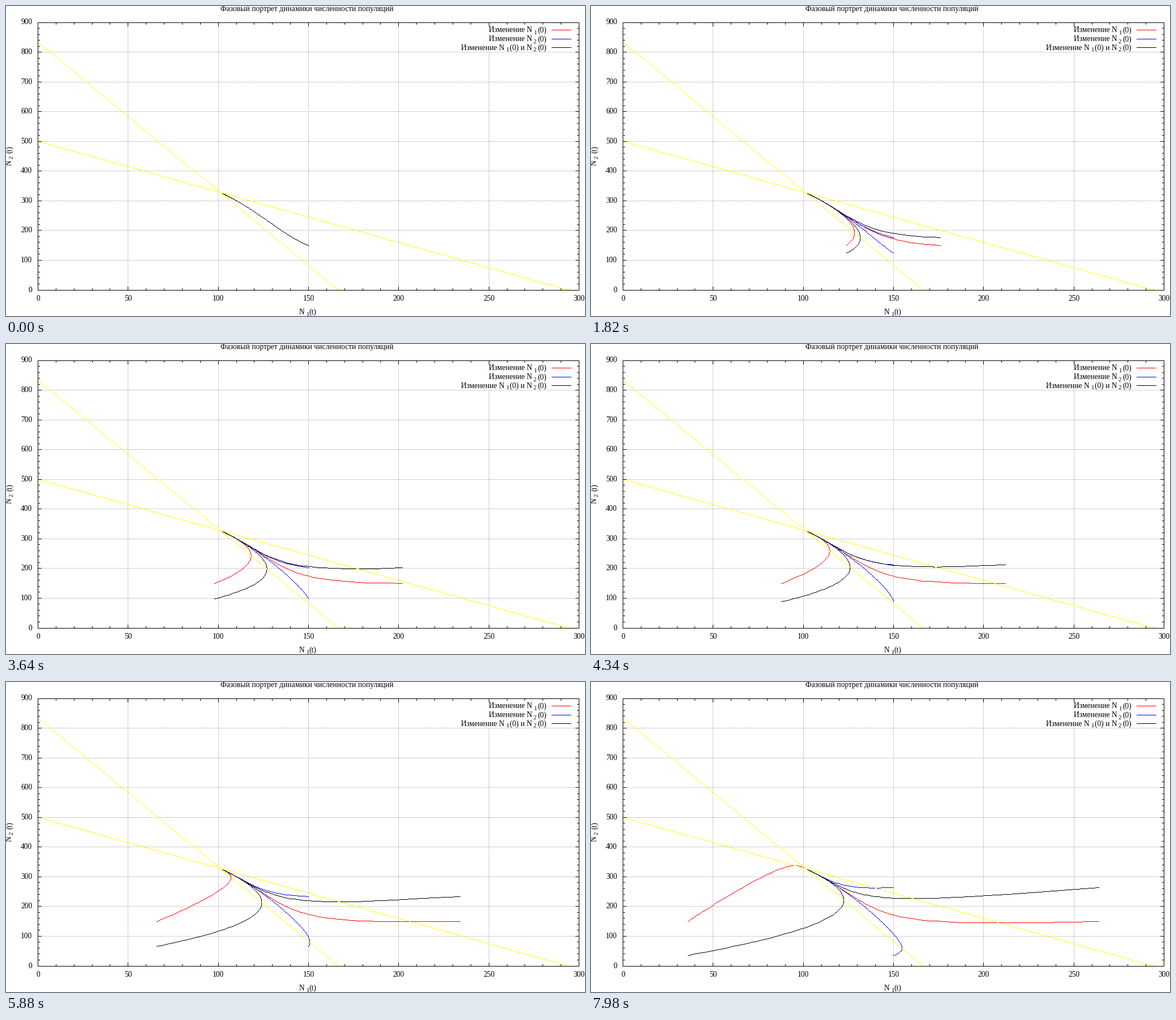
These frames come from a looping animation (1023x548 px, 8 s). A matplotlib script:

```python
import numpy as np
import matplotlib.pyplot as plt
from matplotlib.animation import FuncAnimation
from matplotlib.patches import PathPatch
from matplotlib.path import Path

W, H, DPI = 1023, 548, 64
PX = 72 / DPI                      # one pixel in points
LEFT, RIGHT, TOP, BOTTOM = 56, 1012, 28.5, 501.5
X_MAX, Y_MAX = 300, 900

INTERVAL, FRAMES = 40, 200
STEP_MS, STEPS = 70, 115           # start points spread by one unit per step

plt.rcParams["font.family"] = "Liberation Serif"
fig = plt.figure(figsize=(W / DPI, H / DPI), dpi=DPI, facecolor="white")
ax = fig.add_axes([0, 0, 1, 1])
ax.set_xlim(0, W)
ax.set_ylim(H, 0)
ax.axis("off")

CORNERS = np.array([(0, 0), (1, 0), (1, 1), (0, 1), (0, 0)])
CODES = [Path.MOVETO, Path.LINETO, Path.LINETO, Path.LINETO, Path.CLOSEPOLY]


def to_x(n1):
    return LEFT + n1 * (RIGHT - LEFT) / X_MAX


def to_y(n2):
    return BOTTOM - n2 * (BOTTOM - TOP) / Y_MAX


def raster(xs, ys):
    """Pixels of a hard-edged line, one pixel wide, through the points."""
    points = np.floor(np.column_stack([xs, ys]) + 0.5)
    delta = np.diff(points, axis=0)
    count = np.abs(delta).max(axis=1).astype(int)
    seg = np.repeat(np.arange(len(count)), count)
    first = np.cumsum(count) - count
    t = (np.arange(len(seg)) - first[seg]) / count[seg]
    inner = np.floor(points[seg] + delta[seg] * t[:, None] + 0.5)
    return np.vstack([inner, points[-1:]])


def pixel_path(pixels):
    corners = (pixels[:, None, :] + CORNERS).reshape(-1, 2)
    return Path(corners, np.tile(CODES, len(pixels)))


def draw(lines, color, z):
    patch = PathPatch(pixel_path(np.vstack(lines)), facecolor=color,
                      edgecolor="none", linewidth=0, snap=False, zorder=z)
    return ax.add_artist(patch)


def text(x, y, s, ha="left", size=13.5, rotation=0):
    ax.text(x, y, s, ha=ha, va="baseline", fontsize=size * PX,
            rotation=rotation, rotation_mode="anchor", zorder=9)


def sub(x, y, s, rotation=0):
    text(x, y, s, size=10.8, rotation=rotation)


def draw_grid():
    lines = [raster([LEFT, RIGHT], [to_y(v)] * 2) for v in range(100, Y_MAX, 100)]
    for v in range(50, X_MAX, 50):
        top = to_y(800) if v == 250 else TOP      # leave room for the legend
        lines.append(raster([to_x(v)] * 2, [BOTTOM, top]))
    draw([line[::2] for line in lines], "#a0a0a0", 1)


def draw_frame():
    lines = [raster([LEFT, RIGHT, RIGHT, LEFT, LEFT],
                    [TOP, TOP, BOTTOM, BOTTOM, TOP])]
    for v in range(0, X_MAX + 1, 10):
        x, n = to_x(v), 3 if v % 50 else 6
        lines += [raster([x, x], [BOTTOM, BOTTOM - n]),
                  raster([x, x], [TOP, TOP + n])]
        if v % 50 == 0:
            text(x + 0.5, 521, str(v), "center")
    for v in range(0, Y_MAX + 1, 20):
        y, n = to_y(v), 3 if v % 100 else 6
        lines += [raster([LEFT, LEFT + n], [y, y]),
                  raster([RIGHT, RIGHT - n], [y, y])]
        if v % 100 == 0:
            text(46.5, y + 4, str(v), "right")
    draw(lines, "black", 8)


def draw_labels():
    text(532, 9.5, "Фазовый портрет динамики численности популяций", "center")

    text(517.5, 545, "N")
    sub(530, 548, "1")
    text(535.5, 545, "(t)")

    text(10, 282.5, "N", rotation=90)
    sub(13, 269.5, "2", rotation=90)
    text(10, 260.5, "(t)", rotation=90)

    rows = (("red", 42, "1"), ("blue", 58, "2"), ("black", 73, "2"))
    for color, y, index in rows:
        base = y + 4.5
        draw([raster([964, 998], [y, y])], color, 7)
        sub(932, base + 3, index)
        text(955.5, base, "(0)", "right")
        if color == "black":
            text(880.5, base, "Изменение N", "right")
            sub(883, base + 3, "1")
            text(930, base, "(0) и N", "right")
        else:
            text(930, base, "Изменение N", "right")


def draw_isoclines():
    n1 = np.linspace(0, X_MAX, 100)
    for n2 in ((2500 - 15 * n1) / 3, 500 - 1.7 * n1):
        line = raster(to_x(n1), to_y(n2))
        draw([line[line[:, 1] <= BOTTOM]], "yellow", 6)


def rate(p):
    """Two competing species with equal growth rates."""
    n1, n2 = p
    return np.array([n1 * (1 - (n1 + 0.2 * n2) * 0.006),
                     n2 * (1 - (n2 + 1.7 * n1) / 500)])


def solve(start, dt=0.1, steps=150):
    path = [start]
    for _ in range(steps):
        p = path[-1]
        a = rate(p)
        b = rate(p + a * dt / 2)
        c = rate(p + b * dt / 2)
        d = rate(p + c * dt)
        path.append(p + (a + 2 * b + 2 * c + d) * dt / 6)
    return np.array(path)


BRANCHES = [("red", -1, 0), ("red", 1, 0), ("blue", 0, -1), ("blue", 0, 1),
            ("black", -1, -1), ("black", 1, 1)]

shift = np.arange(STEPS)
starts = np.array([[150 + shift * d1 for _, d1, _ in BRANCHES],
                   [150 + shift * d2 for _, _, d2 in BRANCHES]], float)
paths = solve(starts)              # time, species, branch, step
path_x, path_y = to_x(paths[:, 0]), to_y(paths[:, 1])


def branch_pixels(i, step):
    return raster(path_x[:, i, step], path_y[:, i, step])


draw_grid()
draw_frame()
draw_labels()
draw_isoclines()
curves = [draw([branch_pixels(i, 0)], color, 4 + 0.1 * i)
          for i, (color, _, _) in enumerate(BRANCHES)]


def update(frame):
    step = min((frame * INTERVAL + 30) // STEP_MS, STEPS - 1)
    for i, curve in enumerate(curves):
        curve.set_path(pixel_path(branch_pixels(i, step)))
    return curves


anim = FuncAnimation(fig, update, frames=FRAMES, interval=INTERVAL,
                     repeat=True, repeat_delay=0, blit=False)
plt.show()
```
